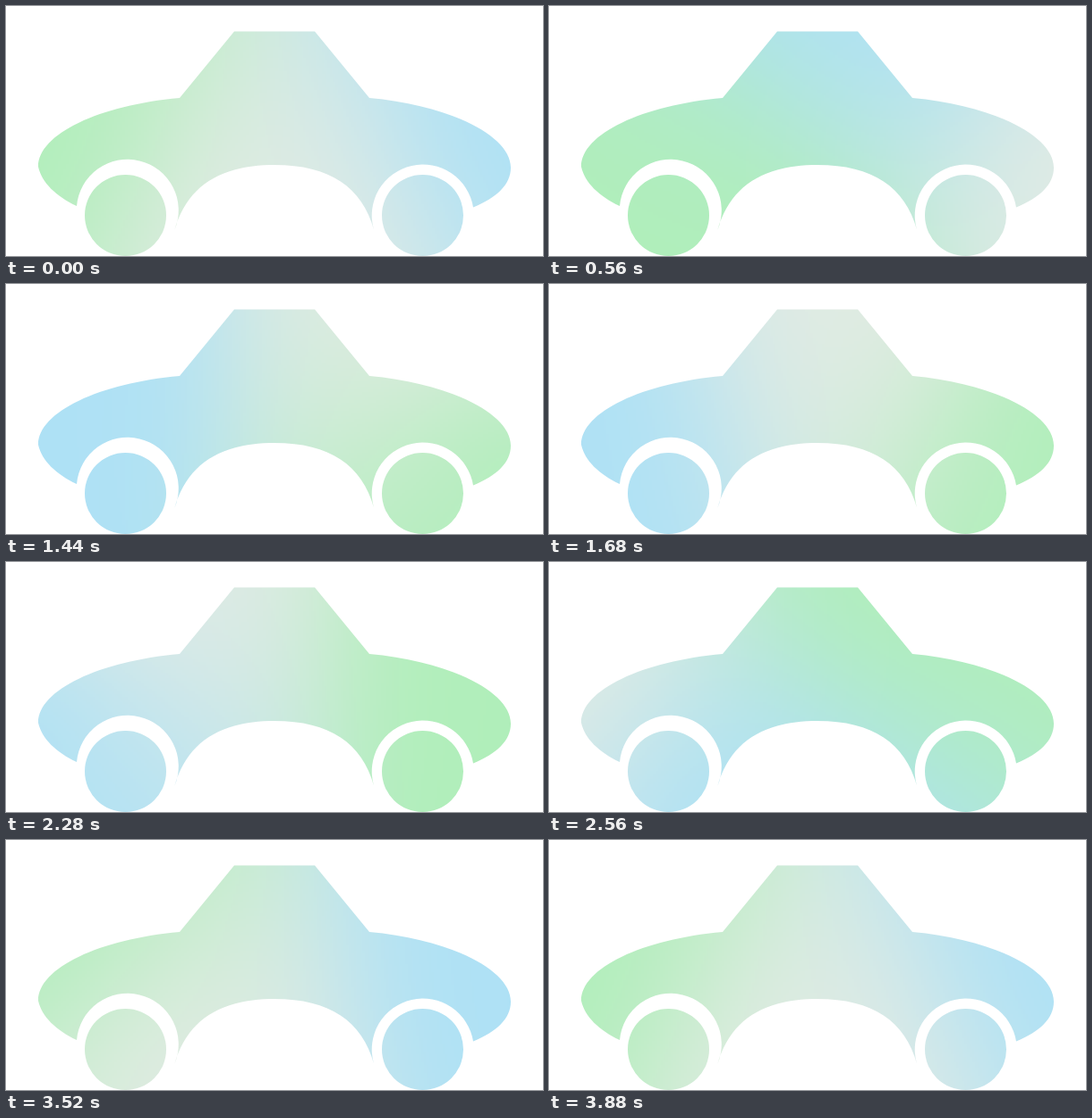
An HTML page with a canvas that plays this animation: 600x280 px, repeating every 3960 ms.

```html
<!DOCTYPE html>
<html lang="en">
<head>
<meta charset="utf-8">
<title>Gradient car</title>
<style>
html, body { margin: 0; width: 100%; height: 100%; overflow: hidden; background: #fff; }
canvas {
  display: block; width: 600px; height: 280px;
  clip-path: path("M255 28.5H345L406 103C495 111 564 145 564 181C564 200 548 215 522 225.5A57 57 0 1 0 411 250.5C398 203 362 178 300 178C238 178 202 203 188.5 250.5A57 57 0 1 0 79 224C56 213 40 198 36 180C36 143 105 111 194 103ZM88 234.5a45.5 45.5 0 1 0 91 0a45.5 45.5 0 1 0 -91 0ZM420 234.5a45.5 45.5 0 1 0 91 0a45.5 45.5 0 1 0 -91 0Z");
}
</style>
</head>
<body>
<canvas width="200" height="94"></canvas>
<script>
const LOOP = 3960, STEP = 1000, DELAY = 100, TURN = 900;
const canvas = document.querySelector('canvas');
const ctx = canvas.getContext('2d');
const { width: W, height: H } = canvas;
const image = ctx.createImageData(W, H);

// Colours and their starting quarter on the ellipse, counter-clockwise from the right
const spots = [
  { quarter: 0, rgb: [174, 225, 245] },
  { quarter: 2, rgb: [176, 238, 186] },
  { quarter: 3, rgb: [226, 235, 228] }
];

// cubic-bezier(.25, .1, .25, 1)
function ease(x) {
  if (x <= 0 || x >= 1) return x <= 0 ? 0 : 1;
  let lo = 0, hi = 1, u = 0.5;
  for (let i = 0; i < 24; i++) {
    u = (lo + hi) / 2;
    if (0.75 * u * (1 - u) + u ** 3 < x) lo = u; else hi = u;
  }
  return 0.3 * u * (1 - u) ** 2 + 3 * u * u * (1 - u) + u ** 3;
}

function draw(t) {
  const step = Math.floor(t / STEP);
  const turn = step + ease((t - step * STEP - DELAY) / TURN);
  const points = spots.map(({ quarter, rgb }) => {
    const a = (quarter + turn) * Math.PI / 2;
    return { x: 300 + 300 * Math.cos(a), y: 140 - 130 * Math.sin(a), rgb };
  });
  let k = 0;
  for (let j = 0; j < H; j++) {
    for (let i = 0; i < W; i++) {
      const x = (i + 0.5) * 600 / W, y = (j + 0.5) * 280 / H;
      let r = 0, g = 0, b = 0, sum = 0;
      for (const p of points) {
        const near = Math.max(0, 0.9 - Math.hypot(x - p.x, y - p.y) / 600);
        const w = near ** 4;
        r += w * p.rgb[0];
        g += w * p.rgb[1];
        b += w * p.rgb[2];
        sum += w;
      }
      image.data[k++] = r / sum;
      image.data[k++] = g / sum;
      image.data[k++] = b / sum;
      image.data[k++] = 255;
    }
  }
  ctx.putImageData(image, 0, 0);
}

const start = performance.now();
function tick() {
  draw((performance.now() - start) % LOOP);
  requestAnimationFrame(tick);
}
tick();
</script>
</body>
</html>
```
